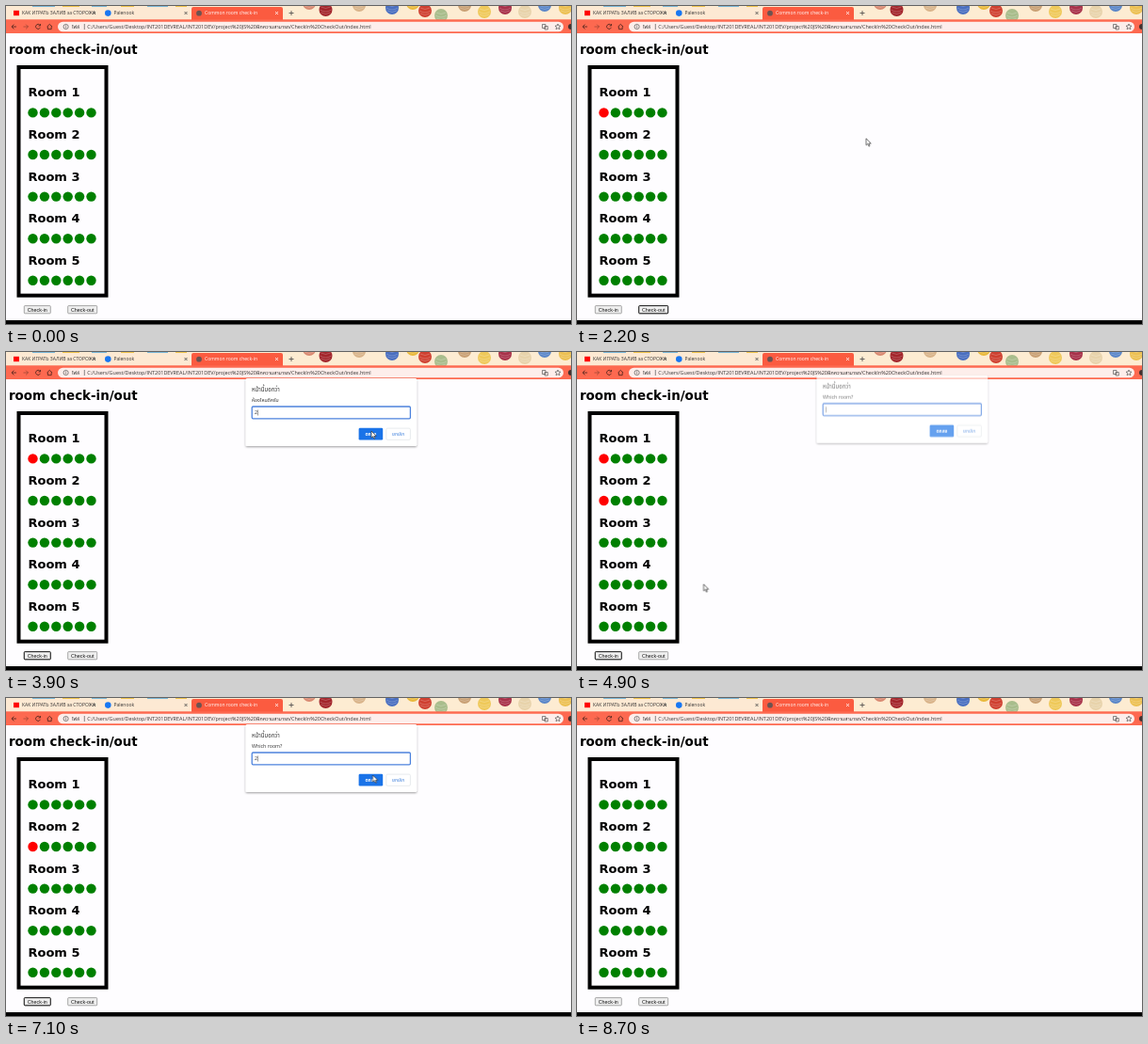
These frames come from a looping animation (600 by 338 pixels, 9100 ms). An HTML page:

```html
<!DOCTYPE html>
<html lang="en">
<head>
<meta charset="utf-8">
<title>Common room check-in</title>
<style>
html, body { margin: 0; width: 100%; height: 100%; overflow: hidden; background: #fefdff; }
svg { display: block; width: 100vw; height: 100vh; }
text { font-family: "Open Sans", "Noto Sans", "Noto Sans Thai", sans-serif; fill: #333; white-space: pre; }
.bold { font: bold 13px "DejaVu Sans", sans-serif; fill: #000; }
.tab { font-size: 5px; }
.btn text { font: 5.35px "Liberation Sans", Arial, sans-serif; fill: #111; text-anchor: middle; }
.btn rect { fill: #efefef; stroke: #858585; stroke-width: .7; }
.btn .focus { fill: none; stroke: #222; stroke-width: 1; opacity: 0; }
.icon { fill: none; stroke: #5c2a22; stroke-width: .9; }
.seat { fill: #008000; }

/* One loop is 9100 ms, so 1% is 91 ms */
.move { animation: 9100ms linear infinite; }
.hold { animation: 9100ms step-end infinite; }
#cursor { animation-name: path; }
#dialog { animation-name: dialog; }
#thai { animation-name: thai; }
#which { animation-name: which; }
#one { animation-name: one; }
#two { animation-name: two; }
#caret { animation-name: caret; }
#seat1 { animation-name: seat1; }
#seat2 { animation-name: seat2; }
#in .focus { animation-name: focusIn; }
#out .focus { animation-name: focusOut; }

@keyframes path {
  0%, 1.1% { transform: translate(110px, 268px); opacity: 0; }
  5.5%, 7.7% { transform: translate(110px, 268px); opacity: 1; }
  9.3%, 10.8% { transform: translate(38px, 325px); }
  14.29% { transform: translate(195px, 127px); }
  18.7%, 22.5% { transform: translate(388px, 84px); }
  29.7%, 34.3% { transform: translate(42.5px, 326px); }
  39.5%, 44% { transform: translate(388px, 84px); }
  49.8%, 52.2% { transform: translate(84px, 322px); }
  53.85% { transform: translate(134px, 247px); }
  57.7%, 60.9% { transform: translate(388px, 84px); }
  63.74% { transform: translate(217.5px, 217px); }
  67%, 70% { transform: translate(82px, 321px); }
  75%, 80% { transform: translate(389.5px, 82px); }
  84.6%, 87.9% { transform: translate(330px, 150px); opacity: 1; }
  94%, 100% { transform: translate(330px, 150px); opacity: 0; }
}
@keyframes dialog {
  0%, 11% { opacity: 0; transform: translateY(-10px); }
  12.7%, 21.5% { opacity: 1; transform: none; }
  23.4% { opacity: 0; transform: none; }
  34.6% { opacity: 0; transform: translateY(-10px); }
  36.3%, 43.4% { opacity: 1; transform: none; }
  45.3% { opacity: 0; transform: none; }
  52.75% { opacity: 0; transform: translateY(-10px); }
  54.4%, 61.9% { opacity: 1; transform: none; }
  63.85% { opacity: 0; transform: none; }
  70.3% { opacity: 0; transform: translateY(-10px); }
  72%, 79.6% { opacity: 1; transform: none; }
  81.5%, 100% { opacity: 0; transform: none; }
}
@keyframes thai { 0% { opacity: 1; } 48%, 100% { opacity: 0; } }
@keyframes which { 0% { opacity: 0; } 48%, 100% { opacity: 1; } }
@keyframes one { 0%, 25%, 66% { opacity: 0; } 17%, 58% { opacity: 1; } 100% { opacity: 0; } }
@keyframes two { 0%, 47%, 85% { opacity: 0; } 40%, 75.5% { opacity: 1; } 100% { opacity: 0; } }
@keyframes caret {
  0%, 25%, 47%, 66%, 85%, 100% { transform: none; }
  17%, 40%, 58%, 75.5% { transform: translateX(3px); }
}
@keyframes seat1 { 0%, 62.6%, 100% { fill: #008000; } 23% { fill: #f00; } }
@keyframes seat2 { 0%, 80.8%, 100% { fill: #008000; } 45% { fill: #f00; } }
@keyframes focusOut { 0%, 35%, 100% { opacity: 0; } 10.5% { opacity: 1; } }
@keyframes focusIn { 0%, 63%, 82%, 100% { opacity: 0; } 35%, 69.8% { opacity: 1; } }
</style>
</head>
<body>
<svg viewBox="0 0 600 338" preserveAspectRatio="none">
  <defs>
    <filter id="shadow" x="-10%" y="-15%" width="120%" height="135%">
      <feDropShadow dx="0" dy="1" stdDeviation="1.3" flood-opacity=".38"/>
    </filter>
  </defs>
  <rect width="600" height="338" fill="#fefdff"/>

  <!-- tab strip -->
  <rect width="600" height="15" fill="#fdecd2"/>
  <g id="balls"></g>
  <rect y="1" width="197" height="14" fill="#fde9d3"/>
  <path d="M28 .5h24M91 .5h16M150 .5h22" stroke="#7bb8d8"/>
  <path d="M60 .5h18M122 .5h14M180 .5h12" stroke="#efc44d"/>
  <rect x="8" y="4.8" width="6" height="5.4" fill="#f00"/>
  <text class="tab" x="17" y="9.4">КАК ИГРАТЬ ЗАЛИВ за СТОРОЖА</text>
  <circle cx="108.3" cy="7.6" r="3.3" fill="#1877f2"/>
  <text class="tab" x="114.5" y="9.4">Palenook</text>
  <path d="M197 15V3q0-2 2-2h93q2 0 2 2v12z" fill="#fb5b40"/>
  <circle cx="205" cy="7.7" r="2.9" fill="#6d5350"/>
  <text class="tab" x="211" y="9.4" style="fill:#fff">Common room check-in</text>
  <g fill="none" stroke="#444" stroke-width=".8">
    <path d="M92 6l3 3m0-3l-3 3M189.5 6l3 3m0-3l-3 3M300.5 7.5h5m-2.5-2.5v5"/>
    <path d="M286 6l3 3m0-3l-3 3" stroke="#fff"/>
  </g>

  <!-- toolbar -->
  <rect y="14.3" width="600" height="14.7" fill="#fd6950"/>
  <g class="icon">
    <path d="M11 22H6m2.4-2.4L6 22l2.4 2.4"/>
    <path d="M18.5 22h5m-2.4-2.4l2.4 2.4-2.4 2.4" opacity=".5"/>
    <path d="M36 20.3a2.5 2.5 0 1 0 .4 2.5M36.5 19v2h-2"/>
    <path d="M43.5 22l2.8-2.6 2.8 2.6M44.4 21.6v3h3.8v-3"/>
  </g>
  <rect x="55" y="16.7" width="537" height="10.6" rx="5.3" fill="#fdeeeb"/>
  <g fill="none" stroke="#555" stroke-width=".7">
    <circle cx="63.6" cy="22" r="2.6"/>
    <path d="M63.6 21.4v2.1M63.6 20.2v.7M83.3 19v6"/>
    <path d="M569.5 19.5h3.5v4h-3.5zM572 21.5h3.3v3.5h-3.3z"/>
    <path d="M586 19l.9 2 2.1.2-1.6 1.4.5 2.1-1.9-1.1-1.9 1.1.5-2.1-1.6-1.4 2.1-.2z"/>
  </g>
  <circle cx="600" cy="22" r="3" fill="#42302e"/>
  <text x="70" y="23.9" font-size="5.2">ไฟล์</text>
  <text x="86.3" y="23.9" font-size="5.45">C:/Users/Guest/Desktop/INT201DEVREAL/INT201DEV/project%20JS%20ฝึกความสามารถ/CheckIn%20CheckOut/index.html</text>

  <!-- page -->
  <text class="bold" x="3" y="51" style="font-size:13.4px">room check-in/out</text>
  <rect x="13.5" y="65" width="93" height="242.7" fill="none" stroke="#000" stroke-width="4"/>
  <g id="rooms"></g>
  <g class="btn" id="in">
    <rect x="19.3" y="318.6" width="28" height="8.2" rx=".8"/>
    <rect class="focus hold" x="19.3" y="318.6" width="28" height="8.2" rx=".8"/>
    <text x="33.3" y="324.6">Check-in</text>
  </g>
  <g class="btn" id="out">
    <rect x="65.7" y="318.6" width="31" height="8.2" rx=".8"/>
    <rect class="focus hold" x="65.7" y="318.6" width="31" height="8.2" rx=".8"/>
    <text x="81.2" y="324.6">Check-out</text>
  </g>
  <rect y="334" width="600" height="4" fill="#000"/>

  <!-- prompt -->
  <g id="dialog" class="move">
    <rect x="254.5" y="28" width="181.7" height="72" rx="1.5" fill="#fff" filter="url(#shadow)"/>
    <text x="261" y="41.5" font-size="6.1">หน้านี้บอกว่า</text>
    <text id="thai" class="hold" x="261" y="52.8" font-size="5.2">ห้องไหนดีครับ</text>
    <text id="which" class="hold" x="261" y="52.8" font-size="5.3">Which room?</text>
    <rect x="261.2" y="58" width="168.2" height="12.8" rx="1.2" fill="#fff" stroke="#4d83dd" stroke-width="1.3"/>
    <text id="one" class="hold" x="264" y="66.4" font-size="5.3">1</text>
    <text id="two" class="hold" x="264" y="66.4" font-size="5.3">2</text>
    <path id="caret" class="hold" d="M264.3 61.5v6" stroke="#333" stroke-width=".6"/>
    <rect x="374.6" y="80.8" width="25.6" height="12.8" rx="1.3" fill="#1a73e8"/>
    <text x="387.4" y="88.8" font-size="4.9" font-weight="bold" text-anchor="middle" style="fill:#fff">ตกลง</text>
    <rect x="403.8" y="81.1" width="25.6" height="12.2" rx="1.3" fill="#fff" stroke="#dfe2e6" stroke-width=".7"/>
    <text x="416.6" y="88.8" font-size="4.9" text-anchor="middle" style="fill:#3d7fdc">ยกเลิก</text>
  </g>

  <path id="cursor" class="move" d="M0 0v7.2l1.7-1.5 1.2 2.6 1.1-.5-1.2-2.5h2.4z" fill="#fff" stroke="#333" stroke-width=".7"/>
</svg>
<script>
const $ = id => document.getElementById(id);

function add(parent, tag, attrs, label = "") {
  const el = document.createElementNS("http://www.w3.org/2000/svg", tag);
  for (const key in attrs) el.setAttribute(key, attrs[key]);
  el.textContent = label;
  parent.append(el);
  return el;
}

for (let room = 0; room < 5; room++) {
  const y = room * 44.6;
  add($("rooms"), "text", { class: "bold", x: 23.5, y: 96.3 + y }, `Room ${room + 1}`);
  for (let i = 0; i < 6; i++) {
    const seat = add($("rooms"), "circle", { class: "seat hold", cx: 28.5 + i * 12.4, cy: 113.4 + y, r: 5.2 });
    if (!i && room < 2) seat.id = `seat${room + 1}`;
  }
}

const balls = [
  [322, -3, "#d98a72"], [339.5, 4, "#a3262c"], [375, -1, "#d9b48a"], [410, 2, "#4a6fc0"],
  [432, -3, "#e9b93c"], [445, 5, "#cf4030"], [462, 10, "#a9bd8c"], [487, -1, "#c9a074"],
  [508, 6, "#efc95a"], [530, 2, "#a8324a"], [551, 6, "#e8d3ab"], [572, -1, "#5a86c8"], [594, 2, "#ecc052"]
];
for (const [x, y, fill] of balls) {
  add($("balls"), "circle", { cx: x, cy: y, r: 7, fill });
  add($("balls"), "path", {
    d: `M${x - 5} ${y - 3}q5 3 10 0M${x - 6} ${y}q6 4 12 0M${x - 5} ${y + 3}q5 3 10 0`,
    fill: "none", stroke: "#fff", "stroke-width": .6, opacity: .35
  });
}
</script>
</body>
</html>
```
